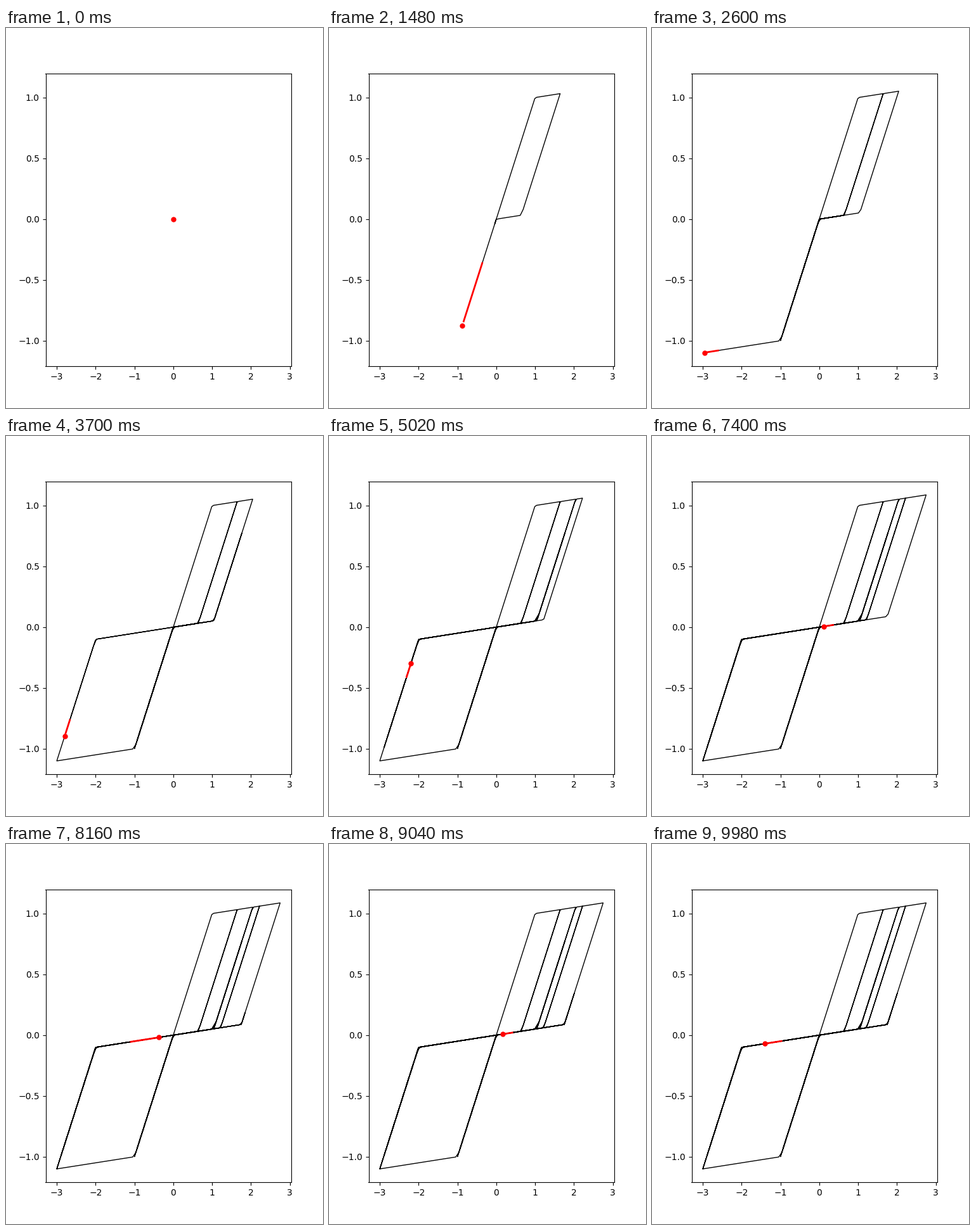
A matplotlib script for the animation above (10 s loop, 500 px wide and 600 px high).

```python
import numpy as np
import matplotlib.pyplot as plt
from matplotlib.animation import FuncAnimation

FRAMES = 500
INTERVAL = 20    # ms
SUB = 10         # samples per frame
SLOPE = 0.05     # stiffness while slipping or yielding
HALF_WAVE = 8    # usual frames between turning points

# Strongest swings: (frame, displacement); ordinary ones are filled in between
PEAKS = [
    (64, -0.04), (69.42, 1.645), (74.74, -1), (81.9, 2.045), (130.5, -3),
    (138, 1.765), (185.2, -2.8), (202.5, -2.89), (208, 2.22), (250.1, -2.31),
    (285.5, 2.752), (326, 0.05), (335.1, 1.264), (343.5, -3), (397.5, 1.85),
    (405, -1.8), (411.2, 1.2), (433.5, 2.01), (441.5, -2.76), (494, 0.18),
    (501.7, -2),
]


def is_high(x):
    return x > 0.1


def turning_points():
    """Rest, then a faint tremor, then alternating highs and lows."""
    rng = np.random.default_rng(4)
    points = [(0, 0), (25, 0)]
    points += [(25 + 5 * k, -0.02 * (-1) ** k) for k in range(1, 8)]
    for (t0, x0), (t1, x1) in zip(PEAKS, PEAKS[1:]):
        points.append((t0, x0))
        odd = int(is_high(x0) != is_high(x1))
        gaps = 2 * round(((t1 - t0) / HALF_WAVE - odd) / 2) + odd
        sign = 1 if is_high(x0) else -1
        for k in range(1, gaps):
            sign = -sign
            points.append((t0 + (t1 - t0) * k / gaps, sign * rng.uniform(0.3, 0.95)))
    points.append(PEAKS[-1])
    return np.array(points, dtype=float).T


def displacement(t):
    """Join the turning points with half cosine waves."""
    times, values = turning_points()
    k = np.searchsorted(times, t, side="right") - 1
    u = (t - times[k]) / (times[k + 1] - times[k])
    return values[k] + (values[k + 1] - values[k]) * (1 - np.cos(np.pi * u)) / 2


def restoring_force(path):
    """Bilinear spring whose slack grows on each side as it yields."""
    slack_pos = slack_neg = 0.0
    force = []
    for x in path:
        slack_pos = max(slack_pos, x - 1)
        slack_neg = min(slack_neg, x + 1)
        grip = max(x - slack_pos, 0) + min(x - slack_neg, 0)
        force.append(SLOPE * x + (1 - SLOPE) * grip)
    return np.array(force)


def padded(values):
    pad = 0.05 * np.ptp(values)
    return values.min() - pad, values.max() + pad


xs = displacement(np.arange((FRAMES - 1) * SUB + 1) / SUB)
ys = restoring_force(xs)

fig, ax = plt.subplots(figsize=(5, 6), dpi=100)
ax.set_xlim(*padded(xs))
ax.set_ylim(*padded(ys))
trace, = ax.plot([], [], color="black", lw=1)
tail, = ax.plot([], [], color="red", lw=2)
dot, = ax.plot([], [], "o", color="red", ms=5)


def update(frame):
    now = frame * SUB
    start = max(0, now - SUB)
    trace.set_data(xs[:now], ys[:now])
    tail.set_data(xs[start:now], ys[start:now])
    dot.set_data([xs[now]], [ys[now]])
    return trace, tail, dot


anim = FuncAnimation(fig, update, frames=FRAMES, interval=INTERVAL,
                     repeat=True, repeat_delay=0)
plt.show()
```
